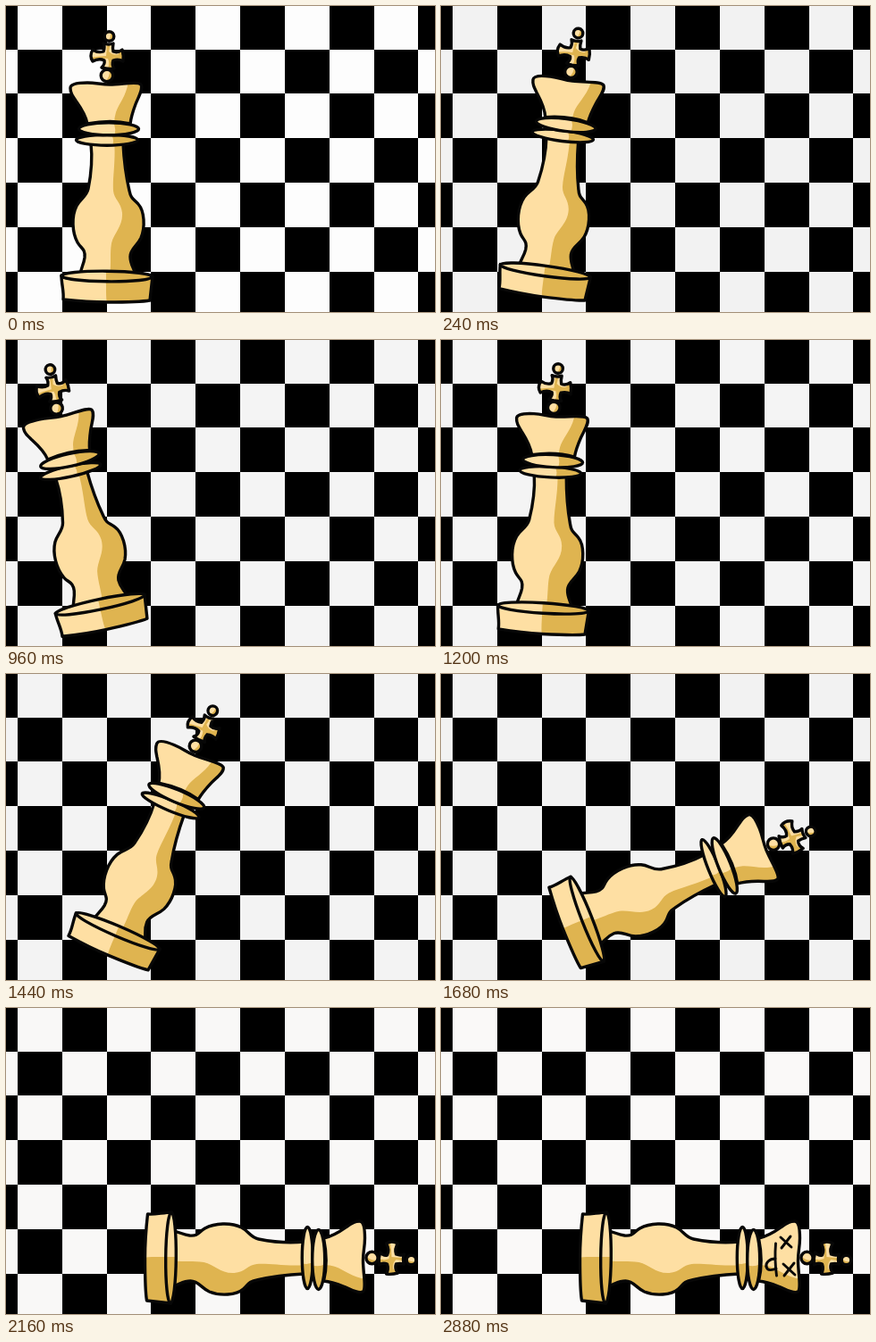
An HTML page with a canvas for the animation above (2960 ms loop, 480 by 343 pixels).

```html
<!DOCTYPE html>
<html lang="en">
<head>
<meta charset="utf-8">
<title>Falling king</title>
<style>
html, body { margin: 0; width: 100%; height: 100%; overflow: hidden; background: #000; }
canvas { display: block; width: 480px; height: 343px; }
</style>
</head>
<body>
<canvas id="stage"></canvas>
<script>
const W = 480, H = 343, LOOP = 2960, STEP = 80;
const INK = '#070707', LIGHT = '#fedfa3', SHADE = '#dfb450';
const canvas = document.getElementById('stage');
const ctx = canvas.getContext('2d');
const dpr = window.devicePixelRatio || 1;
canvas.width = W * dpr;
canvas.height = H * dpr;

// Centre of the foot, and the two corners the piece rocks on
const FOOT = { x: 114, y: 315 };
const LEFT = { x: 65, y: 329 };
const RIGHT = { x: 161.5, y: 330 };

// time, tilt in degrees, slip x, slip y
const POSES = [
  [0, 0, 0, 0], [80, 2.2, 0, 0], [160, 5, 0, 0], [240, 7.3, 0, 0],
  [320, 8.7, .3, 0], [400, 8.5, .5, 0], [480, 7, .5, 0], [560, 4, .3, 0],
  [640, 0, 0, 0], [720, -4.6, 0, 1], [800, -8.7, -.5, 2], [880, -11.6, -1, 3],
  [960, -12.5, -1, 3], [1040, -8.5, -.5, 2], [1120, -2.8, 0, 1], [1200, 3, 0, 0],
  [1280, 9, -1, 1], [1360, 15.6, -1.5, 1.5], [1440, 22.7, -2, 2], [1520, 33, -3, 2],
  [1600, 48, -4, 1], [1680, 68, -5, 0], [1760, 88, -5, -1.5], [1840, 85.4, -6, -3],
  [1920, 90, -4, -1.5], [LOOP, 90, -4, -1.5]
];
const TONES = [[0, 253], [80, 242], [480, 241], [960, 244], [1440, 243], [1840, 241], [2160, 249], [2320, 250], [LOOP, 250]];

function sample(keys, t) {
  let i = 1;
  while (i < keys.length - 1 && t >= keys[i][0]) i++;
  const a = keys[i - 1], b = keys[i];
  const k = (t - a[0]) / (b[0] - a[0]);
  return a.map((v, n) => v + (b[n] - v) * k).slice(1);
}

function disc(x, y, rx, ry, turn = 0) {
  const p = new Path2D();
  p.ellipse(x, y, rx, ry, turn, 0, Math.PI * 2);
  return p;
}

// Each part: outline and the shaded side, which is clipped to the outline
const PARTS = [
  [new Path2D('M95 154 C97 172 95 190 92 205 C90 214 83 216 79 224 C73 236 74 254 80 265 C84 272 89 272 88 282 C87 290 84 293 83 301 L145 301 C143 293 139 290 139 281 C139 272 147 269 151 260 C156 248 155 230 148 222 C143 216 140 217 138 207 C134 190 132 174 131 154 Z'),
   new Path2D('M121 150 C123 174 119 192 120 207 C121 217 129 220 130 232 C131 247 121 254 118 266 C116 278 118 287 116 303 L170 303 V150 Z')],
  [new Path2D('M62 302 C62 312 65 320 64 329 C82 331 96 332 113 332 C130 332 150 332 161 330 C162 321 163 312 164 303 Z'),
   new Path2D('M111 300 C113 313 111 321 113 334 H170 V300 Z')],
  [disc(113, 303, 51, 5.8, .01), new Path2D('M112 295 V311 H170 V295 Z')],
  [new Path2D('M72 92 C72 87 83 86 91 86 C101 86 106 88 116 88 C130 88 147 84 151 88 C154 93 148 102 145 110 C142 118 140 124 139 132 C123 128 106 129 91 132 C89 121 83 113 78 106 C74 100 72 97 72 92 Z'),
   new Path2D('M137 82 C136 99 127 108 123 119 Q121 125 121 135 H160 V82 Z')],
  [disc(113, 150.2, 34.5, 6), new Path2D('M116 142 Q123 150 118 158 H152 V142 Z')],
  [disc(115, 137.8, 33.5, 7), new Path2D('M119 129 Q125 138 120 147 H152 V129 Z')],
  [disc(113, 78, 6.8, 6.6), new Path2D('M115 70 Q118 78 110 86 H124 V70 Z')],
  [new Path2D('M109 42 Q115 44 120 42 Q119 47 120 51 Q125 53 130 49 Q132 56 131 62 Q126 59 120 61 Q118 66 121 70 Q114 71 107 69 Q111 65 110 61 Q104 58 97 62 Q93 56 97 49 Q103 53 109 51 Q111 46 109 42 Z'),
   new Path2D('M117 40 L115 51 Q120 56 126 54 L127 46 H136 V66 H121 V73 H112 Q117 66 114 59 Q105 58 98 63 L94 58 Q104 56 112 56 Q113 48 113 40 Z')],
  [disc(115.5, 34, 5.3, 5.3), new Path2D('M117 27 Q119 34 113 41 H124 V27 Z')]
];

function drawBoard(t) {
  const v = Math.round(sample(TONES, t)[0]);
  const warm = t >= 2000 ? 1 : 0;
  ctx.fillStyle = `rgb(${v},${v - warm},${v - 2 * warm})`;
  ctx.fillRect(0, 0, W, H);
  ctx.fillStyle = '#000';
  const cell = 49.82, edge = n => Math.round(n);
  for (let r = 0; r < 7; r++) {
    for (let c = -1; c < 10; c++) {
      if ((r + c) % 2 === 0) continue;
      const x = edge(13 + c * cell), y = edge(-1.2 + r * cell);
      ctx.fillRect(x, y, edge(13 + (c + 1) * cell) - x, edge(-1.2 + (r + 1) * cell) - y);
    }
  }
}

function drawKing(t) {
  const [tilt, dx, dy] = sample(POSES, t);
  const a = tilt * Math.PI / 180;
  const pivot = tilt < 0 ? LEFT : RIGHT;
  ctx.save();
  ctx.translate(pivot.x + dx, pivot.y + dy);
  ctx.rotate(a);
  ctx.translate(-pivot.x, -pivot.y);
  ctx.lineWidth = 3.4;
  for (const [shape, shade] of PARTS) {
    ctx.fillStyle = LIGHT;
    ctx.fill(shape);
    ctx.save();
    ctx.clip(shape);
    ctx.fillStyle = SHADE;
    ctx.fill(shade);
    ctx.restore();
    ctx.stroke(shape);
  }
  ctx.restore();
}

// Start time and stroke of each mark on the face
const FACE = [
  [2320, 'M380 257 L392 268'], [2400, 'M391 256 L381 269'],
  [2480, 'M383 287 L396 299'], [2560, 'M395 286 L384 300'],
  [2640, 'M374.5 264 Q373 282 375.5 300'],
  [2800, 'M374 281 C367 281 363 286 364 290'],
  [2880, 'M364 290 C365 295 371 294 375 292']
].map(([at, d]) => [at, new Path2D(d)]);

function drawFace(t) {
  ctx.lineWidth = 2.9;
  for (const [at, mark] of FACE) if (t >= at) ctx.stroke(mark);
}

function draw(now) {
  const t = Math.floor((now % LOOP) / STEP) * STEP;
  ctx.setTransform(dpr, 0, 0, dpr, 0, 0);
  ctx.strokeStyle = INK;
  ctx.lineCap = ctx.lineJoin = 'round';
  drawBoard(t);
  drawKing(t);
  drawFace(t);
}

const start = performance.now();
function tick() {
  draw(performance.now() - start);
  requestAnimationFrame(tick);
}
tick();
</script>
</body>
</html>
```
